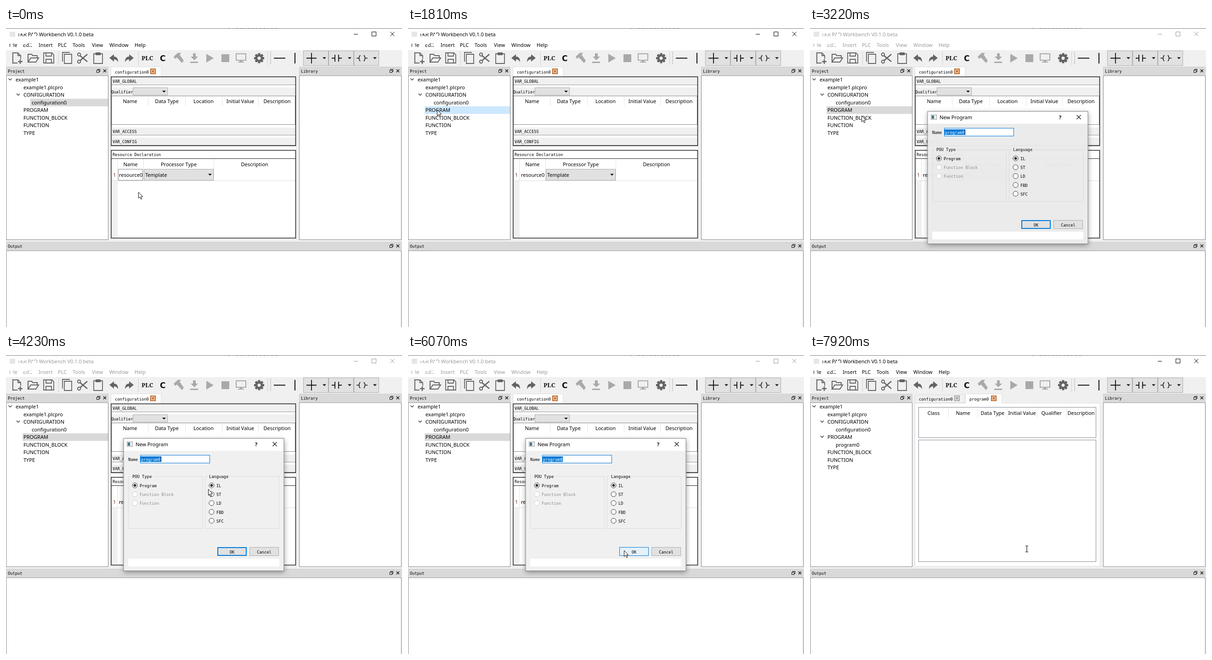
An HTML page with a canvas for the animation above (8000 ms loop, 862x649 px).

```html
<!DOCTYPE html>
<html lang="en">
<head>
<meta charset="utf-8">
<title>PLC editor</title>
<style>
html, body { margin: 0; width: 100%; height: 100%; overflow: hidden; background: #f0f0f0; }
canvas { display: block; }
</style>
</head>
<body>
<canvas id="stage" width="862" height="649"></canvas>
<script>
const ctx = document.getElementById('stage').getContext('2d');
const LOOP = 8000;
const UI = '11px "Noto Sans", "Open Sans", sans-serif';
const MONO = '8.75px "DejaVu Sans Mono", "Liberation Mono", monospace';
const BG = '#f0f0f0', ICON = '#646464', OFF = '#a9a9a9', EDGE = '#828790', BLUE = '#0078d7';

// Pointer steps: time, x, y
const STEPS = [
  [0, 288, 356], [810, 264, 332], [1000, 170, 250], [1190, 85, 176], [1390, 70, 177],
  [1600, 63, 177], [1810, 63, 177], [2010, 63, 177], [2230, 78, 181], [2440, 100, 187],
  [2660, 112, 190], [3050, 112, 190], [3460, 112, 191], [3650, 135, 198], [3840, 190, 215],
  [4040, 277, 241], [4230, 440, 291], [4430, 452, 334], [4640, 463, 376], [4850, 470, 402],
  [5050, 473, 415], [5260, 474, 419], [5450, 472, 422], [5860, 470, 424], [6470, 472, 427],
  [7700, 472, 424], [7920, 472, 421]
];
const T = { select: 1810, menu: 2010, pick: 3050, dialog: 3220, solid: 3460, over: 5260, press: 6280, done: 6470 };

function rect(x, y, w, h, fill, line) {
  if (fill) { ctx.fillStyle = fill; ctx.fillRect(x, y, w, h); }
  if (line) { ctx.strokeStyle = line; ctx.lineWidth = 1; ctx.strokeRect(x + .5, y + .5, w - 1, h - 1); }
}
function stroke(d, color = ICON, w = 1) {
  ctx.strokeStyle = color; ctx.lineWidth = w; ctx.stroke(new Path2D(d));
}
function fill(d, color = ICON) { ctx.fillStyle = color; ctx.fill(new Path2D(d)); }
function text(s, x, mid, color = '#000', font = UI, align = 'left') {
  ctx.font = font; ctx.fillStyle = color; ctx.textAlign = align;
  ctx.fillText(s, x, mid + (font === MONO ? 3.5 : 4));
}
const mono = (s, x, mid, color = '#000') => text(s, x, mid, color, MONO);
const label = (s, x, mid) => text(s, x, mid, '#000', UI, 'center');
const ring = (x, y, r, color, w = 1) => {
  ctx.beginPath(); ctx.arc(x, y, r, 0, 7);
  ctx.strokeStyle = color; ctx.lineWidth = w; ctx.stroke();
};
const dot = (x, y, r, color) => {
  ctx.beginPath(); ctx.arc(x, y, r, 0, 7); ctx.fillStyle = color; ctx.fill();
};
const cross = (x, y, r, color = '#000', w = 1) =>
  stroke(`M${x - r} ${y - r}l${2 * r} ${2 * r}M${x + r} ${y - r}l${-2 * r} ${2 * r}`, color, w);
const arrow = (x, y) => fill(`M${x - 4} ${y - 2}h8l-4 4z`, '#111');
const vlines = (xs, y, h) => xs.forEach(x => rect(x, y, 1, h, '#e2e2e2'));
const frameBox = (y, h) => stroke(`M229 ${y}h401.5v${h}h-401.5z`, '#222', 1.5);

function titleBar(active) {
  const ink = active ? '#000' : '#999';
  rect(0, 0, 862, 49, '#fff');
  rect(0, 0, 862, 1, '#777');
  for (let i = 0; i < 12; i++) rect(i ? 492 + i * 8.5 : 484, 0, i % 3 ? 5 : 3, 1, '#4a3a48');
  rect(8, 8, 12, 11, '#e6e6e6');
  text('TKR PAD Workbench V0.1.0 beta', 25, 13.5, ink);
  rect(24, 7, 19, 5, '#fff');
  rect(56, 13, 10, 6, '#fff');
  stroke('M757 13.5h9', ink);
  rect(796, 8, 10, 10, null, ink);
  cross(841, 13, 4.5, ink);
  [['File', 7], ['Edit', 37], ['Insert', 71], ['PLC', 113], ['Tools', 145], ['View', 187], ['Window', 225], ['Help', 280]]
    .forEach(([s, x]) => text(s, x, 37, ink));
  rect(9, 36, 6, 7, '#fff');
  rect(6, 30, 10, 4, '#fff');
  rect(37, 30, 9, 6, '#fff');
  rect(50, 35, 8, 4, '#fff');
}

function toolBar() {
  rect(0, 48, 862, 36, BG);
  for (let y = 52; y < 80; y += 4) [13, 575].forEach(x => rect(x, y, 2, 2, '#b5b5b5'));
  [114, 288, 569].forEach(x => rect(x, 51, 1, 30, '#d0d0d0'));
  stroke('M25 76H15V54h11l6 6v7M26 54v6h6', ICON, 1.8);
  stroke('M26 73h10M31 68v10', ICON, 2.4);
  stroke('M48 74V57h8l2 3h10v5M48 74l6-9h17l-6 9z', ICON, 2);
  stroke('M82 54h18l4 4v18H82zM87 54v7h12v-7M87 76v-8h12v8', ICON, 1.8);
  stroke('M127 57h16v20h-16zM123 73V53h16', ICON, 1.8);
  ring(159, 57.5, 3.2, ICON, 2);
  ring(159, 73, 3.2, ICON, 2);
  stroke('M161 60l16 13M161 71l16-14', ICON, 2.6);
  stroke('M191 56h19v21h-19z', ICON, 1.8);
  fill('M195 53h11v6h-11z');
  fill('M225 65l10-8v5q9 0 9 12q-3-6-9-6v5z');
  fill('M278 65l-10-8v5q-9 0-9 12q3-6 9-6v5z');
  text('PLC', 295, 66, '#111', 'bold 13px "Noto Serif", "DejaVu Serif", serif');
  text('C', 335, 67.5, '#111', 'bold 17px "DejaVu Sans", sans-serif');
  fill('M365 62l9-8h7l-3 4 9 13-4 5-11-12-4 3z', OFF);
  fill('M407 55h6v7h5l-8 8-8-8h5zM401 73h17v3h-17z', OFF);
  fill('M436 56l16 9.5-16 9.5z', OFF);
  rect(469, 57, 17, 17, OFF);
  stroke('M501 56h21v14h-21z', OFF, 2);
  fill('M509 71h5v2h4v2h-13v-2h4z', OFF);
  for (let i = 0; i < 8; i++) {
    const c = Math.cos(i * Math.PI / 4), s = Math.sin(i * Math.PI / 4);
    stroke(`M${551 + 6 * c} ${65.5 + 6 * s}L${551 + 11 * c} ${65.5 + 11 * s}`, ICON, 5);
  }
  ring(551, 65.5, 6, ICON, 5);
  stroke('M583 65.5h25M629 54v23', '#111', 2);
  [647, 702, 757].forEach(x => { rect(x, 49, 55, 33, '#e1e1e1', '#adadad'); arrow(x + 46, 65.5); });
  stroke('M654 65.5h22M665 54v23M709 65.5h7M724 65.5h7M716 58v15M724 58v15', '#111', 1.8);
  stroke('M763 65.5h5M782 65.5h5M771 59q-5 6.5 0 13M779 59q5 6.5 0 13', '#111', 1.6);
}

function dock(name, x, y, w, h) {
  rect(x, y, w, 18, '#d9d9d9', '#cfcfcf');
  mono(name, x + 4, y + 9.5);
  const r = x + w;
  rect(r - 24, y + 5, 6, 6, null, '#111');
  rect(r - 26, y + 7, 6, 6, '#d9d9d9', '#111');
  cross(r - 8, y + 9, 3, '#111', 1.4);
  rect(x, y + 19, w, h, '#fff', EDGE);
}

function tree(t) {
  const done = t >= T.done, picked = t >= T.select;
  const mark = (x, row, c) => rect(x, 104 + row * 16.5, 222 - x, 16.5, c);
  if (!picked) mark(53, 3, '#d9d9d9');
  if (picked && !done) mark(36, 4, t < T.pick ? '#cce8ff' : '#d9d9d9');
  else if (t >= 1190 && !picked) mark(36, 4, '#e5f3ff');
  const rows = [['example1', 21], ['example1.plcpro', 38], ['CONFIGURATION', 38], ['configuration0', 56], ['PROGRAM', 38],
    ['FUNCTION_BLOCK', 38], ['FUNCTION', 38], ['TYPE', 38]];
  if (done) rows.splice(5, 0, ['program0', 56]);
  rows.forEach(([s, x], i) => text(s, x, 112 + i * 16.5));
  const fold = (x, y) => stroke(`M${x - 3.5} ${y - 2}l3.5 3.5 3.5-3.5`, '#333', 1.3);
  fold(9, 111.5);
  fold(26.5, 144.5);
  if (done) fold(26.5, 177.5);
}

function tab(name, x, w, on) {
  rect(x, on ? 84 : 86, w, on ? 21 : 18, on ? '#fff' : BG, '#dedede');
  if (on) rect(x + 1, 103, w - 2, 3, '#fff');
  mono(name, x + 9, 95);
  const cx = x + w - 18;
  rect(cx - 6, 88, 12, 12, on ? '#d98243' : '#b9b9b9', on ? '#a85518' : '#999');
  rect(cx - 4, 90, 8, 8, on ? '#f4d3b5' : '#eee');
  cross(cx, 94, 2.5, on ? '#b65a1c' : '#888', 1.6);
}

function band(name, y) {
  rect(230, y, 400, 17, BG);
  rect(230, y + 16, 400, 1, '#999');
  mono(name, 232, y + 8.5);
}

function configuration(focus) {
  band('VAR_GLOBAL', 107);
  rect(230, 129, 400, 18, BG);
  mono('Qualifier', 229, 138);
  rect(276, 129, 76, 17, '#e1e1e1', '#adadad');
  arrow(344, 138);
  rect(229, 147, 401, 63, '#fff', EDGE);
  ['Name', 'Data Type', 'Location', 'Initial Value', 'Description']
    .forEach((s, i) => label(s, 270 + i * 80, 158.5));
  vlines([309, 390, 470, 549], 149, 20);
  band('VAR_ACCESS', 216);
  band('VAR_CONFIG', 238);
  frameBox(106, 149.5);

  rect(229, 283, 402, 1, '#222');
  mono('Resource Declaration', 232, 274.5);
  label('Name', 271, 295.5);
  label('Processor Type', 376, 295.5);
  label('Description', 541, 295.5);
  rect(230, 332, 13, 123, BG);
  vlines([242, 299, 452], 284, 48);
  rect(230, 331, 400, 1, '#dedede');
  text('1', 233, 319, '#6b3a20');
  text('resource0', 246, 318.5);
  if (focus) {
    ctx.setLineDash([1, 1]);
    rect(244, 306, 54, 25, null, '#111');
    ctx.setLineDash([]);
  }
  rect(300, 306, 152, 25, '#e1e1e1', '#adadad');
  text('Template', 303, 318.5);
  arrow(444, 318.5);
  frameBox(265.5, 190.5);
}

function program() {
  rect(236, 113, 387, 67, '#fff', EDGE);
  ['Class', 'Name', 'Data Type', 'Initial Value', 'Qualifier', 'Description']
    .forEach((s, i) => label(s, 269 + i * 64.2, 125.5));
  vlines([301, 365, 430, 494, 558], 115, 21);
  rect(236, 184, 387, 265, '#fff', EDGE);
}

function menu(hot) {
  rect(67, 181, 136, 24, 'rgba(0,0,0,.28)');
  rect(63, 177, 138, 25, '#f2f2f2', '#a0a0a0');
  if (hot) rect(65, 179, 134, 21, '#91c9f7');
  text('Insert PROGRAM', 92, 189.5);
}

function group(name, x, w) {
  rect(x, 263, w, 114, null, '#dcdcdc');
  rect(x + 7, 260, name.length * 5.25 + 4, 6, BG);
  mono(name, x + 9, 263);
}

function radio(name, x, y, on, enabled = true) {
  dot(x, y, 5.5, '#fff');
  ring(x, y, 5.5, enabled ? '#333' : '#ccc');
  if (on) dot(x, y, 3, '#333');
  mono(name, x + 10.5, y + .5, enabled ? '#000' : '#8a8a8a');
}

function button(name, x, face, edge, thick) {
  rect(x, 417, 64, 19, face, edge);
  if (thick) rect(x + 1, 418, 62, 17, null, edge);
  mono(name, x + 32 - name.length * 2.62, 427);
}

function dialog(t, stepTime) {
  ctx.save();
  ctx.globalAlpha = t < T.solid ? .95 : 1;
  ctx.shadowColor = 'rgba(0,0,0,.4)';
  ctx.shadowBlur = 11;
  ctx.shadowOffsetY = 3;
  rect(255.5, 180.5, 350, 288.5, BG);
  ctx.restore();
  rect(256, 181, 349, 27, '#fff');
  rect(255.5, 180.5, 350, 288.5, null, '#777');
  rect(263, 188, 13, 11, '#eee', '#999');
  rect(265, 190, 5, 7, '#3d7480');
  text('New Program', 282, 194);
  text('?', 542, 194, '#000', 'bold 11px "Noto Sans", sans-serif');
  cross(585, 193.5, 4.5, '#111', 1.1);
  mono('Name', 266, 226);
  rect(292, 217, 152, 18, '#fff', BLUE);
  rect(293, 220, 44, 12, BLUE);
  mono('program0', 294, 226, '#fff');
  if (Math.floor((stepTime - T.pick) / 530) % 2 === 0) rect(337, 220, 1, 12, '#111');
  group('POU Type', 266, 162);
  group('Language', 433, 162);
  ['Program', 'Function Block', 'Function'].forEach((s, i) => radio(s, 280.5, 283 + i * 19.2, !i, !i));
  ['IL', 'ST', 'LD', 'FBD', 'SFC'].forEach((s, i) => radio(s, 447.5, 283 + i * 19.2, !i));
  if (t >= T.press) button('OK', 460, '#cce4f7', '#005499');
  else if (t >= T.over) button('OK', 460, '#e5f1fb', BLUE);
  else button('OK', 460, '#e1e1e1', BLUE, true);
  button('Cancel', 530, '#e1e1e1', '#adadad');
  rect(266, 442, 329, 17, '#fff');
}

function pointer(x, y, beam) {
  if (beam) {
    stroke(`M${x - 3} ${y - 6.5}h2.5l.5 .5 .5-.5h2.5M${x} ${y - 6}v12M${x - 3} ${y + 6.5}h2.5l.5-.5 .5 .5h2.5`, '#111', 1.2);
    return;
  }
  const d = `M${x + .5} ${y + .5}v13l3-2.8 2.2 5 2.2-1-2.2-4.7h4.2z`;
  fill(d, '#fff');
  stroke(d, '#111');
}

function draw(t) {
  const [stepTime, x, y] = STEPS.findLast(s => s[0] <= t);
  const done = t >= T.done, modal = t >= T.pick && !done;
  rect(0, 0, 862, 649, BG);
  titleBar(!modal);
  toolBar();
  dock('Project', 0, 84, 223, 357);
  dock('Library', 638, 84, 223, 357);
  dock('Output', 0, 464, 861, 167);
  tree(t);
  rect(228, 104, 404, 355, '#fff', '#dedede');
  tab('configuration0', 228, 110, !done);
  if (done) {
    tab('program0', 338, 80, true);
    program();
  } else configuration(t < T.select);
  if (t >= T.menu && t < T.pick) menu(y > 179);
  if (t >= T.dialog && !done) dialog(t, stepTime);
  pointer(x, y, done);
}

function frame(now) {
  draw(now % LOOP);
  requestAnimationFrame(frame);
}
requestAnimationFrame(frame);
</script>
</body>
</html>
```
